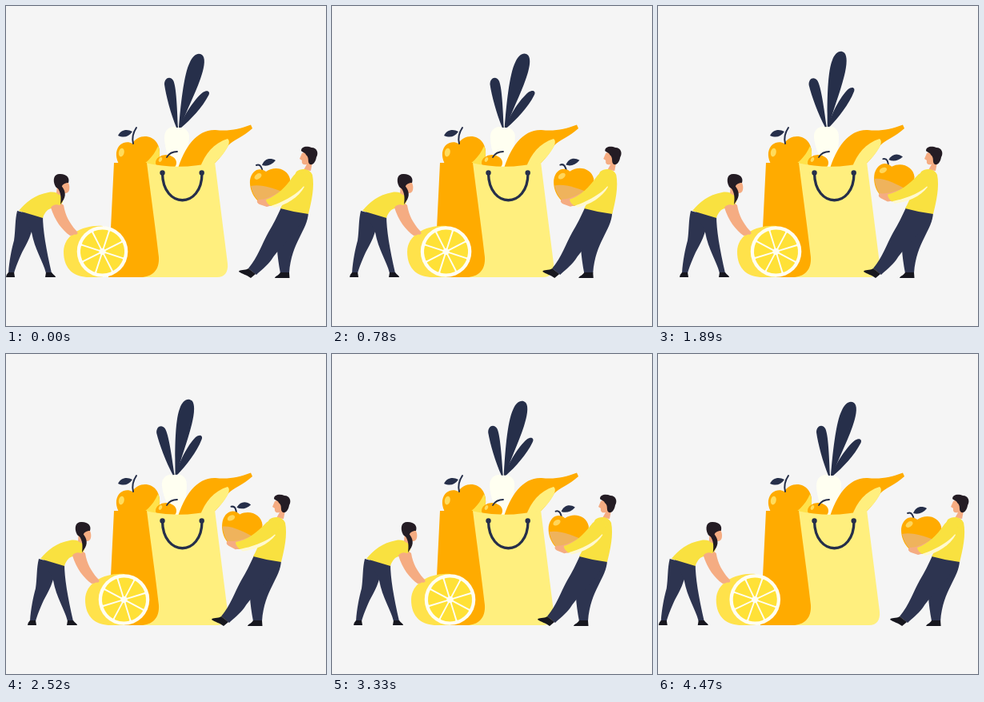
These frames come from a looping animation (400x400 px, 4500 ms). An HTML page:

```html
<!DOCTYPE html>
<html lang="en">
<head>
<meta charset="utf-8">
<title>Groceries</title>
<style>
html, body { margin: 0; width: 100%; height: 100%; overflow: hidden; background: #f5f5f5; }
svg { display: block; width: 100%; height: 100%; }
.navy { fill: #262f4a; }
.pants { fill: #2d3450; }
.shoe { fill: #17171f; }
.orange { fill: #ffab00; }
.pale { fill: #ffef7e; }
.lemon { fill: #ffe24b; }
.shirt { fill: #f9e140; }
.skin { fill: #f5ac82; }
.hair { fill: #241c24; }
.line { fill: none; stroke: #262f4a; stroke-linecap: round; }
</style>
</head>
<body>
<svg viewBox="0 0 400 400">
  <rect width="400" height="400" fill="#f5f5f5"/>

  <g id="root">
    <path fill="#fffff1" d="M198 164C198 154 206 150 213 151C222 150 230 156 229 165C228 180 222 196 214 208C205 197 198 180 198 164Z"/>
    <path class="navy" d="M216 152C218 128 222 85 230 70C234 61 241 57 246 62C250 67 247 80 243 91C236 111 224 134 218 152Z"/>
    <path class="navy" d="M213 152C206 135 200 112 198 98C198 90 205 87 209 93C213 100 214 130 215 152Z"/>
    <path class="navy" d="M217 152C222 137 235 117 246 108C252 104 256 107 253 112C246 126 230 143 219 152Z"/>
  </g>

  <!-- fruit in the bag -->
  <path class="orange" d="M214 206C223 176 239 154 262 155C278 157 291 154 306 148.5L308 153C297 163 284 168 278 174C271 186 263 196 252 204Z"/>
  <path class="pale" d="M242 204C248 185 260 171 277 166C280 168 279 173 276 178C270 188 262 196 252 204Z"/>
  <path class="orange" d="M158 172C163 163 174 161 182 165C190 169 193 179 192 187C190 194 186 200 180 206H150C141 201 137 191 138 183C140 171 151 168 158 172Z"/>
  <path class="lemon" d="M190 175C193 181 193 190 188 197L183 206H160C174 198 184 189 190 175Z"/>
  <ellipse cx="144.3" cy="183" rx="3.4" ry="5.4" fill="#ffdc5c" transform="rotate(12 144 183)"/>
  <path class="line" stroke-width="2" d="M163 152C159 158 157 164 159 172"/>
  <path class="navy" d="M140 162C143 155 151 153 158 157C153 164 147 165 140 162Z"/>
  <ellipse class="orange" cx="200" cy="196" rx="13" ry="10"/>
  <ellipse cx="193" cy="192" rx="2" ry="3" fill="#ffdc5c" transform="rotate(25 193 192)"/>
  <path class="line" stroke-width="1.8" d="M201 189C204 184 209 182 214 182"/>

  <!-- bag -->
  <path class="pale" d="M174 196Q218 206 261 195L277 322C278 333 273 339 264 339H160Z"/>
  <path class="orange" d="M135 196H176C180 229 187 278 191 314C192 330 183 339 168 339H128Z"/>
  <path class="line" stroke-width="3.3" d="M195.5 209C196 254 245 254 245 209"/>
  <circle class="navy" cx="195.5" cy="208.5" r="3.2"/>
  <circle class="navy" cx="244.7" cy="208.5" r="3.2"/>

  <g id="woman">
    <path class="lemon" d="M121 275C98 273 72 285 72 307C72 330 86 339 104 339H121Z"/>
    <circle cx="120.5" cy="307" r="31.8" fill="#fffef2"/>
    <g id="slice" fill="#ffe137" stroke="#ffe137" stroke-width="2" stroke-linejoin="round"></g>

    <path class="pants" d="M14 256L36 262C34 284 25 299 20 308C15 319 12 327 10 334H3C4 318 7 304 10 293C12 280 11 268 14 256Z"/>
    <path class="pants" d="M20 257L46 262C46 280 50 303 57 334H50C46 318 36 305 32 283Z"/>
    <path class="shoe" d="M3 333H10L11 339H0Q0 336 3 333Z"/>
    <path class="shoe" d="M50 333H57C59 336 62 337 62 339H49Z"/>
    <path class="skin" d="M62 241L72 249C74 262 80 272 87 280C92 284 89 287 84 285L78 280Z"/>
    <path class="shirt" d="M16 256C25 245 36 236 53 233C64 231 72 237 71 245C67 252 58 251 52 255C48 259 47 262 46 265Z"/>
    <path class="skin" d="M56 252C59 247 67 247 70 252C72 262 76 271 83 279C88 284 86 287 80 287C70 280 61 268 56 252Z"/>
    <path class="skin" d="M63 234L64 223L74 218C79 219 80 226 79 230C78 234 74 235 71 233L70 238Z"/>
    <path class="hair" d="M62 226C57 216 61 209 68 210C76 210 80 215 78 221C73 221 70 223 69 228C66 229 64 228 62 226Z"/>
    <path class="hair" d="M66 222C73 227 76 235 72 242L68 248C69 240 69 233 64 227Z"/>
  </g>

  <g id="man">
    <path class="pants" d="M349 254L378 258C377 281 357 294 354 334H343C339 312 337 294 341 281Z"/>
    <path class="pants" d="M344 252L374 257C369 281 345 297 332 317C326 325 318 331 313 336L303 328C315 314 320 297 328 283C334 273 339 263 344 252Z"/>
    <path class="shoe" d="M343 333H354L354.500 340H336C337 337 341 337 343 333Z"/>
    <path class="shoe" d="M303 328L312 335L306 340C301 336 295 335 291 332C292 329 299 331 303 328Z"/>
    <path class="skin" d="M370 184L367 191L370 193C369 198 373 199 376 198L372 205L381 206L384 190L378 181Z"/>
    <path class="hair" d="M369 181C369 175 377 175 382 177C389 177 391 184 388 189C387 195 384 199 380 198C376 195 380 190 375 186C374 183 371 183 369 181Z"/>
    <path class="shirt" d="M363 207C369 202 380 203 383 211C386 226 382 244 378 260Q361 258 343 253C350 241 354 224 363 207Z"/>

    <g id="load">
      <path class="line" stroke-width="2" d="M313 199C318 197 320 202 321 208"/>
      <path class="navy" d="M320 199C323 191 330 189 337 193C332 199 326 201 320 199Z"/>
      <path class="orange" d="M325 207C336 199 352 203 355 216C356 232 346 249 330 250C314 249 304 233 305 218C307 205 317 201 325 207Z"/>
      <ellipse cx="315" cy="213" rx="5" ry="3.2" fill="#ffd65a" transform="rotate(-35 315 213)"/>
      <path fill="#efb35c" d="M306 225C318 222 335 228 351 234C345 246 337 250 330 250C318 249 309 239 306 225Z"/>
      <path class="skin" d="M342 233C333 237 325 242 316 242C313 243 313 246 317 248L326 251L348 245Z"/>
      <path fill="#fff9cf" d="M373 226C366 239 350 249 335 252L331 249L366 221Z"/>
      <path class="shirt" d="M358 214C363 205 377 208 376 219C371 231 350 244 331 250C328 248 325 245 325 242C339 237 349 227 358 214Z"/>
    </g>
  </g>
</svg>
<script>
const LOOP = 4500, TRAVEL = 1167;
const $ = id => document.getElementById(id);

// Lemon segments
const SEGMENTS = 8, CX = 120.5, CY = 307;
const polar = (r, a) => `${(CX + r * Math.cos(a)).toFixed(2)} ${(CY + r * Math.sin(a)).toFixed(2)}`;
let wedges = "";
for (let i = 0; i < SEGMENTS; i++) {
  const step = 2 * Math.PI / SEGMENTS, mid = (i + 0.9) * step, half = step / 2 - 0.075;
  wedges += `<path d="M${polar(5, mid)}L${polar(26.5, mid - half)}A26.5 26.5 0 0 1 ${polar(26.5, mid + half)}Z"/>`;
}
$("slice").innerHTML = wedges;

const clamp = x => Math.min(1, Math.max(0, x));
const wave = x => (1 - Math.cos(Math.PI * clamp(x))) / 2;
const curve = (s, a, b) => 3 * a * s * (1 - s) ** 2 + 3 * b * s * s * (1 - s) + s ** 3;

// Steady start, soft stop
function glide(x) {
  let lo = 0, hi = 1;
  for (let i = 0; i < 24; i++) {
    const mid = (lo + hi) / 2;
    if (curve(mid, 1 / 6, 2 / 3) < x) lo = mid; else hi = mid;
  }
  return curve(lo, 1 / 6, 1);
}

function draw(t) {
  const near = glide(clamp(Math.min(t, LOOP - t) / TRAVEL));
  const sway = t < 2250 ? wave((t - 540) / 1710) : wave((3900 - t) / 1650);
  $("woman").setAttribute("transform", `translate(${27 * near} 0)`);
  $("slice").setAttribute("transform", `rotate(${55 * near} ${CX} ${CY})`);
  $("man").setAttribute("transform", `translate(${-34 * near} 0)`);
  $("load").setAttribute("transform", `rotate(${9 * sway} 370 212)`);
  $("root").setAttribute("transform", `rotate(${-6.2 * sway} 203 195)`);
}

const start = performance.now();
function tick() {
  draw((performance.now() - start) % LOOP);
  requestAnimationFrame(tick);
}
draw(0);
requestAnimationFrame(tick);
</script>
</body>
</html>
```
